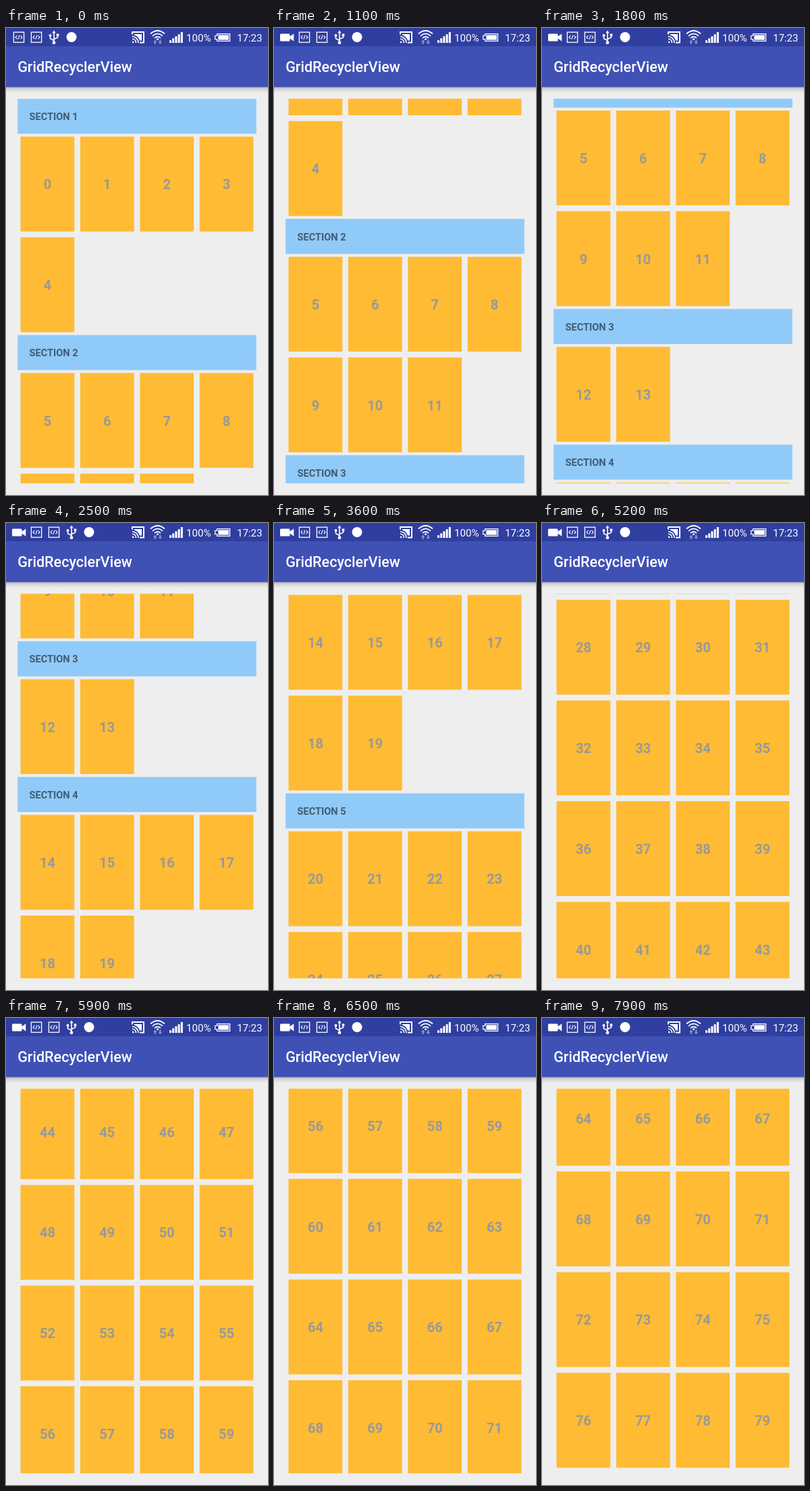
These frames come from a looping animation (388 px wide and 690 px high, 8000 ms). An HTML page:

```html
<!DOCTYPE html>
<html lang="en">
<head>
<meta charset="utf-8">
<title>Sectioned grid</title>
<style>
  html, body { margin: 0; width: 100%; height: 100%; overflow: hidden; background: #eee; }
  svg { display: block; width: 388px; height: 690px; font-family: Roboto, "Noto Sans", sans-serif; }
  .num { font-size: 20px; font-weight: 700; fill: #999; text-anchor: middle; }
  .head { font-size: 14.6px; font-weight: 700; fill: #425c72; }
  .title { font-size: 21.55px; font-weight: 500; fill: #fff; }
  .status { font-size: 15.1px; fill: #fff; }
</style>
</head>
<body>
<svg viewBox="0 0 388 690">
  <defs>
    <clipPath id="view"><rect x="0" y="104.5" width="388" height="568.2"/></clipPath>
    <linearGradient id="shade" x1="0" y1="0" x2="0" y2="1">
      <stop offset="0" stop-color="#000" stop-opacity=".27"/>
      <stop offset=".4" stop-color="#000" stop-opacity=".1"/>
      <stop offset="1" stop-color="#000" stop-opacity="0"/>
    </linearGradient>
    <g id="code" fill="none" stroke="#fff">
      <rect x="-7.6" y="6.2" width="15.2" height="15" stroke-width="1.3"/>
      <path d="M-2.6 11.2L-5 13.7L-2.6 16.2M2.6 11.2L5 13.7L2.6 16.2M1 10.8L-1 16.6" stroke-width="1.1"/>
    </g>
  </defs>
  <rect width="388" height="690" fill="#eee"/>
  <g clip-path="url(#view)"><g id="list"></g></g>

  <rect y="87" width="388" height="9" fill="url(#shade)"/>
  <rect width="388" height="87.3" fill="#3f51b5"/>
  <rect width="388" height="27" fill="#303f9f"/>
  <text class="title" x="17.2" y="65.3">GridRecyclerView</text>

  <path id="camera" fill="#fff" d="M10.5 8.5H22q1.5 0 1.5 1.5v2.6l5.8-4v11l-5.8-4V18q0 1.5-1.5 1.5H10.5Q9 19.500 9 18V10q0-1.500 1.500-1.500Z"/>
  <g id="notes">
    <use href="#code" x="45"/>
    <use href="#code" x="71"/>
    <g fill="none" stroke="#fff" stroke-width="1.6">
      <path d="M97 6V21M97 18.500L91.500 15.500V11.500M97 16.500L102.500 14V10.500"/>
      <path d="M97 3.500L99.600 7.500H94.400Z" fill="#fff" stroke="none"/>
      <circle cx="97" cy="21.700" r="2.400" fill="#fff" stroke="none"/>
      <circle cx="91.500" cy="11" r="2" fill="#fff" stroke="none"/>
      <rect x="100.700" y="8.500" width="3.600" height="3.600" fill="#fff" stroke="none"/>
    </g>
    <circle cx="123" cy="13.500" r="7.500" fill="#fff"/>
  </g>

  <g fill="none" stroke="#fff" stroke-width="1.9">
    <path d="M187 9.500V6H204V21.500H198"/>
    <path d="M187 12.500A9.500 9.500 0 0 1 196 22M187 16A6 6 0 0 1 192.500 22" stroke-width="1.700"/>
    <path d="M187 19.300A3 3 0 0 1 189.700 22H187Z" fill="#fff" stroke="none"/>
    <path d="M190 9H201V18.500H198Q196 12 190 10.500Z" fill="#fff" stroke="none"/>
  </g>
  <g fill="none" stroke="#fff" stroke-width="1.7">
    <path d="M214 8.500Q224.500 -.5 235 8.500M217 11.800Q224.500 5 232 11.800M220 14.800Q224.500 10.800 229 14.800"/>
    <circle cx="224.500" cy="16.500" r="1.600" fill="#fff" stroke="none"/>
  </g>
  <path fill="#8f98cc" d="M220.700 17.500L223.500 20.800H221.700V24H219.700V20.800H217.900ZM228.300 24L225.500 20.700H227.300V17.500H229.300V20.700H231.100Z"/>
  <path fill="#fff" d="M242 18h3v4h-3ZM246.200 15.200h3v6.800h-3ZM250.400 12.200h3V22h-3ZM254.600 9.200h3V22h-3ZM258.800 6h3V22h-3Z"/>
  <text class="status" x="267" y="19.600">100%</text>
  <path fill="none" stroke="#fff" stroke-width="1.300" d="M312.600 8.700H331.500V19.300H312.600V16.700H309.600V11.300H312.600Z"/>
  <rect x="314.300" y="10.400" width="15.500" height="7.200" fill="#fff"/>
  <text class="status" x="379.500" y="19.600" text-anchor="end">17:23</text>
</svg>
<script>
const LOOP = 8000, STEP = 100;
const TOP = 104.5, LEFT = 17.24, PAD = 4.31;
const HEAD_H = 51.73, ROW_H = 148.74, COL_W = 88.38;
const SECTIONS = [5, 7, 2, 6, 64];

const list = document.getElementById('list');
const camera = document.getElementById('camera');
const notes = document.getElementById('notes');

function add(tag, attrs, text) {
  const el = document.createElementNS('http://www.w3.org/2000/svg', tag);
  for (const key in attrs) el.setAttribute(key, attrs[key]);
  if (text !== undefined) el.textContent = text;
  list.appendChild(el);
}

function addHeader(y, label) {
  add('rect', { x: LEFT, y, width: COL_W * 4, height: HEAD_H, fill: '#90caf9' });
  add('text', { class: 'head', x: LEFT * 2, y: y + 31.6 }, label);
}

function addCard(x, y, label) {
  const w = COL_W - PAD * 2, h = ROW_H - PAD * 2;
  add('rect', { x: x + PAD, y: y + PAD, width: w, height: h, fill: '#ffbb33' });
  add('text', { class: 'num', x: x + COL_W / 2, y: y + PAD + 77.8 }, label);
}

function buildList() {
  let y = TOP, n = 0;
  SECTIONS.forEach((count, s) => {
    addHeader(y, 'SECTION ' + (s + 1));
    y += HEAD_H;
    for (let i = 0; i < count; i++) {
      addCard(LEFT + (i % 4) * COL_W, y + Math.floor(i / 4) * ROW_H, n++);
    }
    y += Math.ceil(count / 4) * ROW_H;
  });
}

// Scroll positions: [ms, px], joined by a monotone cubic
const KEYS = [
  [200, 0], [1100, 171.7], [2500, 628.1], [3600, 953.1], [5200, 1592.6],
  [6500, 2658.3], [7100, 2800], [7200, 2800], [7900, 2966.7]
];
const rate = i => (KEYS[i + 1][1] - KEYS[i][1]) / (KEYS[i + 1][0] - KEYS[i][0]);
const slopes = KEYS.map((_, i) => {
  if (i === 0 || i === KEYS.length - 1) return 0;
  const a = rate(i - 1), b = rate(i);
  return a * b > 0 ? 2 * a * b / (a + b) : 0;
});

function scrollAt(t) {
  const last = KEYS.length - 1;
  if (t <= KEYS[0][0]) return KEYS[0][1];
  if (t >= KEYS[last][0]) return KEYS[last][1];
  const i = KEYS.findIndex(k => k[0] > t) - 1;
  const [t0, p0] = KEYS[i], [t1, p1] = KEYS[i + 1];
  const d = t1 - t0, u = (t - t0) / d, v = 1 - u;
  return p0 * (1 + 2 * u) * v * v + p1 * u * u * (3 - 2 * u)
    + d * u * v * (slopes[i] * v - slopes[i + 1] * u);
}

function draw(now) {
  const t = Math.floor((now % LOOP) / STEP) * STEP;
  const recording = t >= 100;
  list.setAttribute('transform', `translate(0 ${-scrollAt(t).toFixed(2)})`);
  camera.setAttribute('visibility', recording ? 'visible' : 'hidden');
  notes.setAttribute('transform', `translate(${recording ? 0 : -26} 0)`);
}

buildList();
const start = performance.now();
function tick() {
  draw(performance.now() - start);
  requestAnimationFrame(tick);
}
tick();
</script>
</body>
</html>
```
